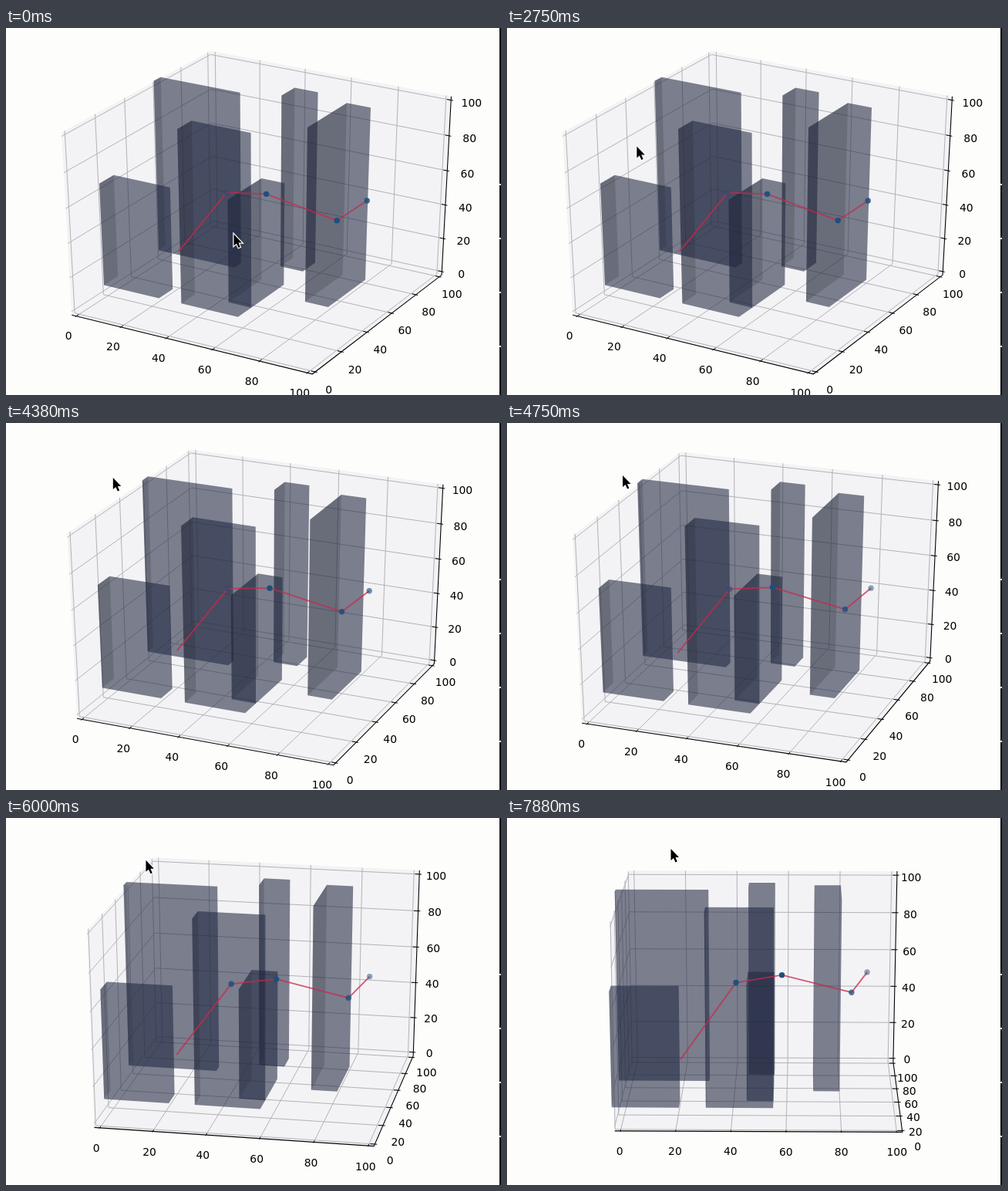
These frames come from a looping animation (642 by 476 pixels, 8 s). An HTML page with a canvas:

```html
<!DOCTYPE html>
<html lang="en">
<head>
<meta charset="utf-8">
<title>Rotating 3D bars</title>
<style>
  html, body { margin: 0; width: 100%; height: 100%; overflow: hidden; background: #fdfdfb; }
  canvas { display: block; }
</style>
</head>
<body>
<canvas id="stage" width="642" height="476"></canvas>
<script>
const ctx = document.getElementById('stage').getContext('2d');
const LOOP = 8000, STEP = 125;
const LO = -100 / 48, HI = 100 - LO, PAD = 5.7;

// x, y, width, depth, height
const BARS = [
  [-5, 65, 35, 5, 100],
  [45, 75, 10, 10, 100],
  [70, 50, 10, 30, 100],
  [45, 35, 10, 25, 60],
  [30, 25, 25, 10, 100],
  [-5, 25, 25, 10, 60]
];
const PATH = [[20, 40, 20], [41, 41, 60], [58, 41, 64], [84, 48, 53], [90, 60, 60]];

// time, x, y: hover, travel to the press point, then drag
const PRESS = { x: 109, y: 74.5 };
const LAG = 200;
const POINTER = [
  [0, 295.5, 267.5], [1630, 270.5, 289.5], [3400, PRESS.x, PRESS.y], [3600, PRESS.x + 1, PRESS.y],
  [4380, 139, 71], [5250, 165, 64], [6550, 193.5, 48], [6750, 207.5, 42], [7430, 212.5, 40]
];
const ARROW = new Path2D('M0 0v15l3.5-3 2.5 5.5 2.3-1L6 11h4.5z');

function pointerAt(t) {
  const i = POINTER.findIndex(k => k[0] > t);
  if (i < 0) return POINTER[POINTER.length - 1].slice(1);
  const [a, b] = [POINTER[i - 1], POINTER[i]];
  const f = (t - a[0]) / (b[0] - a[0]);
  return [1, 2].map(j => a[j] + (b[j] - a[j]) * f);
}

// Dragging across the whole 640x480 figure turns the view by 180 degrees.
function viewAt(t) {
  const [x, y] = t > 3400 + LAG ? pointerAt(t - LAG) : [PRESS.x, PRESS.y];
  return camera(-60 - (x - PRESS.x) * 180 / 640, 30 + (y - PRESS.y) * 180 / 480);
}

// Perspective camera looking at the centre of the 0..100 cube; returns x, y, depth.
function camera(azim, elev) {
  const rad = Math.PI / 180;
  const ca = Math.cos(azim * rad), sa = Math.sin(azim * rad);
  const ce = Math.cos(elev * rad), se = Math.sin(elev * rad);
  return p => {
    const [x, y, z] = p.map(v => v / 100 - 0.5);
    const depth = 10 - (ce * ca * x + ce * sa * y + se * z);
    const right = ca * y - sa * x;
    const up = ce * z - se * (ca * x + sa * y);
    return [329 + 3459 * right / depth, 231.8 - 2594 * up / depth, depth];
  };
}

function trace(points) {
  ctx.beginPath();
  points.forEach(p => ctx.lineTo(p[0], p[1]));
}
function polygon(points, color) {
  trace(points);
  ctx.fillStyle = color;
  ctx.fill();
}
function polyline(points, color, width) {
  trace(points);
  ctx.strokeStyle = color;
  ctx.lineWidth = width;
  ctx.stroke();
}

function hull(points) {
  const cross = (o, a, b) => (a[0] - o[0]) * (b[1] - o[1]) - (a[1] - o[1]) * (b[0] - o[0]);
  const half = list => {
    const out = [];
    for (const p of list) {
      while (out.length > 1 && cross(out[out.length - 2], out[out.length - 1], p) <= 0) out.pop();
      out.push(p);
    }
    return out.slice(0, -1);
  };
  const sorted = [...points].sort((a, b) => a[0] - b[0] || a[1] - b[1]);
  return half(sorted).concat(half(sorted.reverse()));
}

function drawBox(project) {
  const line = (pts, color, width = 1) => polyline(pts.map(project), color, width);
  const pane = pts => polygon(pts.map(project), '#f3f3f5');
  const label = (text, p) => {
    const [x, y] = project(p);
    ctx.fillStyle = '#000';
    ctx.fillText(text, x, y + 11);
  };
  pane([[LO, HI, LO], [LO, HI, HI], [LO, LO, HI], [LO, LO, LO]]);
  pane([[LO, HI, LO], [HI, HI, LO], [HI, HI, HI], [LO, HI, HI]]);
  pane([[LO, HI, LO], [HI, HI, LO], [HI, LO, LO], [LO, LO, LO]]);

  for (let t = 0; t <= 100; t += 20) {
    line([[t, HI, HI], [t, HI, LO], [t, LO, LO]], '#b2b2b8');
    line([[LO, t, HI], [LO, t, LO], [HI, t, LO]], '#b2b2b8');
    line([[LO, LO, t], [LO, HI, t], [HI, HI, t]], '#b2b2b8');

    line([[t, LO - 0.83, LO], [t, LO + 1.67, LO]], '#000');
    line([[HI + 0.83, t, LO], [HI - 1.67, t, LO]], '#000');
    line([[HI + 0.83, HI, t], [HI - 1.67, HI, t]], '#000');
    label(t, [t, LO - PAD, LO - PAD]);
    label(t, [HI + PAD, t, LO - PAD]);
    label(t, [HI + PAD, HI + PAD, t]);
  }
  line([[LO, LO, LO], [HI, LO, LO], [HI, HI, LO], [HI, HI, HI]], '#000', 1.1);
}

function drawBars(project) {
  for (const [x, y, w, d, h] of BARS) {
    const side = sx => [[sx, y, 0], [sx, y + d, 0], [sx, y + d, h], [sx, y, h]].map(project);
    const left = side(x);
    polygon(hull([...left, ...side(x + w)]), 'rgba(32,40,64,.57)');
    polygon(left, 'rgba(20,20,30,.16)');
  }
}

function drawPath(project) {
  const points = PATH.map(project);
  polyline(points, 'rgba(200,40,75,.75)', 1.9);
  const dots = points.slice(1), depths = dots.map(p => p[2]);
  const near = Math.min(...depths), far = Math.max(...depths);
  for (const [x, y, depth] of dots) {
    ctx.globalAlpha = 1 - 0.5 * (depth - near) / (far - near);
    ctx.beginPath();
    ctx.arc(x, y, 3.7, 0, 7);
    ctx.fillStyle = '#1d4f7c';
    ctx.fill();
  }
  ctx.globalAlpha = 1;
}

function drawPointer([x, y]) {
  ctx.save();
  ctx.translate(x, y);
  ctx.strokeStyle = '#fff';
  ctx.lineWidth = 2.4;
  ctx.stroke(ARROW);
  ctx.fillStyle = '#000';
  ctx.fill(ARROW);
  ctx.restore();
}

function drawEdge() {
  ctx.fillStyle = '#000';
  ctx.fillRect(640, 0, 2, 476);
  ctx.fillStyle = '#fff';
  for (let y = 202; y < 476; y += 70) ctx.fillRect(640, y, 2, 2);
}

function render(now) {
  const t = Math.floor(now % LOOP / STEP) * STEP;
  const project = viewAt(t);
  ctx.fillStyle = '#fdfdfb';
  ctx.fillRect(0, 0, 642, 476);
  ctx.font = '13.9px "DejaVu Sans", sans-serif';
  ctx.textAlign = 'center';
  drawBox(project);
  drawBars(project);
  drawPath(project);
  drawEdge();
  drawPointer(pointerAt(t));
}

const begin = performance.now();
(function loop() {
  render(performance.now() - begin);
  requestAnimationFrame(loop);
})();
</script>
</body>
</html>
```
